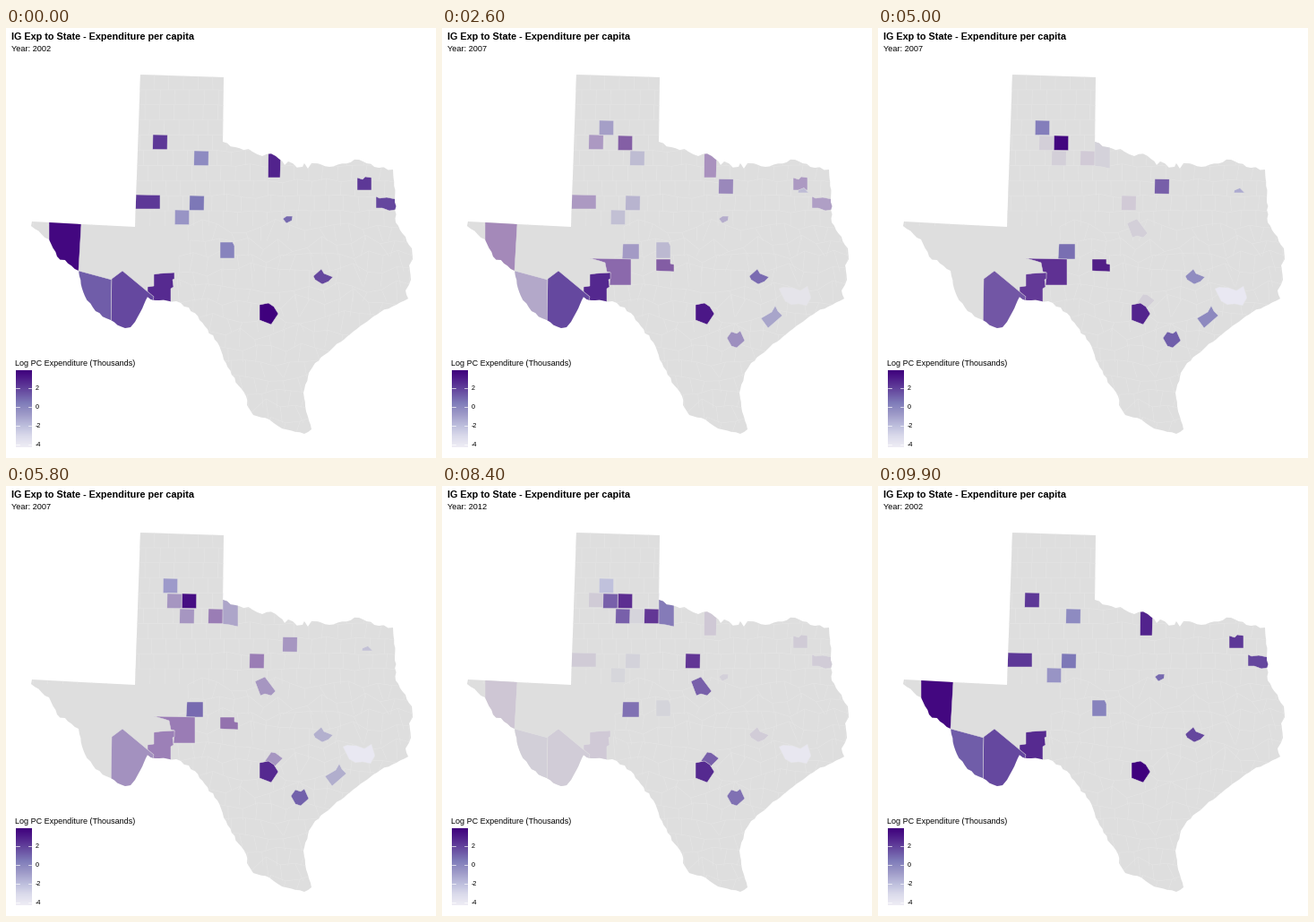
Recreate the animation shown at these times as a matplotlib script. Size 480 by 480 pixels, loop 10 s.

```python
import numpy as np
import matplotlib.pyplot as plt
from matplotlib.animation import FuncAnimation
from matplotlib.collections import LineCollection
from matplotlib.colors import LinearSegmentedColormap, to_rgb
from matplotlib.patches import Polygon

plt.rcParams["font.family"] = "Liberation Sans"
SIZE, DPI = 480, 100
LAND, BORDER = "#dedede", "#e4e4e4"
LOW, HIGH = -4.33, 3.86
PURPLES = LinearSegmentedColormap.from_list("purples", [
    "#efedf5", "#dadaeb", "#bcbddc", "#9e9ac8",
    "#807dba", "#6a51a3", "#54278f", "#3f007d"], N=512)
YEARS = (2002, 2007, 2012)
NA = None

# Transition starts and the offsets of their steps, in tenths of a second.
LONG = (0, 2, 4, 6, 8, 9, 11, 13, 15, 16)
SHORT = (0, 2, 4, 6, 8, 10, 12, 14, 15)
TRANSITIONS = ((17, LONG), (50, LONG), (84, SHORT))

# Key points of the outline; rivers and coast are roughened below.
STRAIGHT = [(29, 216), (48, 217), (84, 219), (144, 222), (150, 52), (243, 55)]
RED_RIVER = [(242, 127), (256, 133), (275, 138), (286, 143), (301, 143), (311, 153),
             (315, 149), (331, 155), (333, 151), (337, 157), (341, 151), (361, 155),
             (394, 147), (411, 155)]
EAST = [(432, 158), (434, 190), (435, 217), (453, 246), (454, 258), (450, 265),
        (452, 281), (446, 293), (449, 302)]
COAST = [(418, 317), (395, 333), (366, 356), (345, 374), (338, 385), (332, 407),
         (335, 428), (341, 448), (333, 453)]
RIO_GRANDE = [(308, 447), (294, 437), (276, 432), (269, 421), (268, 411), (252, 387),
              (243, 370), (236, 351), (216, 326), (204, 312), (190, 305), (171, 304),
              (158, 300), (150, 317), (144, 328), (139, 334), (133, 335), (117, 326),
              (100, 316), (88, 299), (82, 277), (81, 271), (57, 255), (48, 236),
              (28, 221)]

# Square counties: top left corner, then values for the three years.
SQUARES = [
    (164, 119, 2.2, NA, NA), (175.5, 103, NA, .5, -2), (180, 120, NA, NA, 1.5),
    (196.5, 120, NA, 3.75, 3.2), (194, 137, NA, NA, 1.5), (210, 137, -.2, NA, NA),
    (226, 137, NA, NA, 2.9), (309, 168.5, NA, 1.5, NA), (205, 187, .5, NA, NA),
    (188.5, 203, -.6, NA, NA), (272, 187, NA, NA, 2.9)]

# Other counties: values, then corners. Those on the border are cut by the outline.
NORTH = [
    ((2.2, NA, NA), [(145, 186), (172, 186.5), (172, 202), (144.5, 202)]),
    ((NA, NA, .7), [(242, 120), (259, 120), (259, 157), (250, 155), (242, 154)]),
    ((2.8, NA, NA), [(293, 130), (307, 130), (306, 167), (292.5, 167)]),
    ((2.2, NA, NA), [(392, 167), (398, 169), (401, 166), (408, 167), (408, 181),
                     (392, 181)]),
    ((NA, -1.2, NA), [(398, 181), (404, 178.5), (409.5, 184), (397, 184)]),
    ((1.8, NA, NA), [(413, 188), (417, 190), (425, 189), (440, 192), (440, 202),
                     (428, 204), (420, 201), (413, 201)])]
WEST = [
    ((NA, .7, 1), [(201.5, 241), (220, 241), (220, 257.5), (201, 257.5)]),
    ((.1, NA, NA), [(239, 239), (253, 239), (255, 243), (255, 257), (239, 257)]),
    ((NA, 3.86, NA), [(239, 258), (255, 258), (255, 263), (259, 264), (259, 272),
                      (239, 271)]),
    ((NA, 3, NA), [(165, 257), (211, 258), (211, 287), (187, 287), (188, 273),
                   (184, 272), (182, 262), (176, 260)]),
    ((2.6, 2.7, NA), [(165, 275), (172, 274), (188, 273), (188, 280), (186, 281),
                      (187, 289), (184, 291), (184, 315), (158, 303), (158, 289),
                      (165, 288)]),
    ((3.65, NA, NA), [(48, 210), (84, 219), (81, 271), (48, 271)])]
BIG_BEND = [
    ((1.2, NA, NA), [(81, 271), (118, 281), (117, 340), (81, 340)]),
    ((1.75, 1.75, NA), [(118, 280), (130, 271), (165, 300), (158, 340), (117, 340)])]
CENTRAL = [
    ((NA, NA, 1.5), [(278, 218), (289, 213), (301, 229), (296, 234), (289, 232),
                     (284, 234)]),
    ((.9, NA, NA), [(309, 213), (313, 210), (320, 210), (319, 215), (313, 218)]),
    ((1.8, .1, NA), [(343, 277), (352, 269), (355, 274), (365, 278), (360, 283),
                     (353, 286), (345, 281)]),
    ((NA, NA, 1.5), [(289, 307), (296, 297), (301, 298), (309, 304), (300, 313)]),
    ((3.86, 2.8, 2.5), [(283, 309), (293, 307), (299, 311), (304, 319), (296, 331),
                        (283, 326)])]
SOUTH = [
    ((NA, .2, NA), [(372, 310), (375, 316), (380, 321), (364, 335), (356, 324),
                    (368, 317)]),
    ((NA, 1.2, 1), [(318, 346), (323, 339), (329, 341), (333, 338), (338, 349),
                    (329, 357), (323, 355)]),
    ((NA, -4, -4), [(376, 291), (381, 289), (392, 290), (400, 293), (408, 288),
                    (412, 301), (407, 310), (398, 308), (390, 309), (383, 305)])]

TO_XYZ = np.array([[.4124, .3576, .1805], [.2126, .7152, .0722], [.0193, .1192, .9505]])
WHITE = TO_XYZ.sum(axis=1)


def to_lab(rgb):
    rgb = np.asarray(rgb)
    linear = np.where(rgb > .04045, ((rgb + .055) / 1.055) ** 2.4, rgb / 12.92)
    t = TO_XYZ @ linear / WHITE
    f = np.where(t > .008856, np.cbrt(t), 7.787 * t + 16 / 116)
    return np.array([116 * f[1] - 16, 500 * (f[0] - f[1]), 200 * (f[1] - f[2])])


def from_lab(lab):
    fy = (lab[0] + 16) / 116
    f = np.array([fy + lab[1] / 500, fy, fy - lab[2] / 200])
    t = np.where(f > .2069, f ** 3, (f - 16 / 116) / 7.787)
    linear = np.clip(np.linalg.solve(TO_XYZ, t * WHITE), 0, 1)
    return np.where(linear > .0031308, 1.055 * linear ** (1 / 2.4) - .055, 12.92 * linear)


def value_lab(value):
    if value is NA:
        return to_lab(to_rgb(LAND))
    return to_lab(PURPLES((value - LOW) / (HIGH - LOW))[:3])


def roughen(corners, amount, rng, step=4.5):
    """Subdivide a path and push the new points sideways."""
    path = []
    for a, b in zip(np.array(corners[:-1], float), np.array(corners[1:], float)):
        length = np.hypot(*(b - a))
        normal = np.array([a[1] - b[1], b[0] - a[0]]) / length
        path.append(a)
        for t in np.arange(1, int(length / step)) / int(length / step):
            path.append(a + t * (b - a) + normal * rng.normal(0, amount))
    return path


def state_outline():
    rng = np.random.default_rng(7)
    sections = [(STRAIGHT, 0), (RED_RIVER, 1.3), (EAST, .5), (COAST, .4),
                (RIO_GRANDE, .8)]
    path = []
    for i, (corners, amount) in enumerate(sections):
        following = sections[(i + 1) % len(sections)][0][0]
        path += roughen(corners + [following], amount, rng)
    return path


def county_lines():
    """Faint staggered grid, more irregular towards the south-east."""
    rng = np.random.default_rng(4)
    lines = []
    for row in range(24):
        y = 52 + 16.9 * row
        wobble = 0 if row < 10 else 3
        xs = np.arange(20 + rng.uniform(0, 16), 470, 16.3)
        if row >= 10:
            xs = xs[xs > 190]
        noise = rng.normal(0, 1, len(xs)) * (wobble + (xs > 245) * 1.5)
        lines.append(np.column_stack([xs, y + noise]))
        for x, dy in zip(xs, noise):
            lean = rng.normal(0, .3 + wobble + (x > 300))
            lines.append([(x, y + dy), (x + lean, y + 16.9)])
    return lines


def square(x, y, side=16.2):
    return [(x, y), (x + side, y + .3), (x + side - .2, y + side + .5),
            (x - .3, y + side + .3)]


fig = plt.figure(figsize=(SIZE / DPI, SIZE / DPI), dpi=DPI, facecolor="white")
ax = fig.add_axes([0, 0, 1, 1])
ax.axis("off")


def label(x, y, text, px, **style):
    return ax.text(x, y, text, fontsize=px * 72 / DPI, color="black", **style)


state = ax.add_patch(Polygon(state_outline(), fc=LAND, ec="none"))
grid = LineCollection(county_lines(), colors=BORDER, linewidths=.5, zorder=1.5)
ax.add_collection(grid, autolim=False)
grid.set_clip_path(state)

counties = [(values, square(x, y)) for x, y, *values in SQUARES]
counties += NORTH + WEST + BIG_BEND + CENTRAL + SOUTH
shapes = []
for values, corners in counties:
    shape = ax.add_patch(Polygon(corners, ec=BORDER, lw=.35, zorder=2))
    shape.set_clip_path(state)
    shapes.append((shape, values, [value_lab(v) for v in values]))

label(6, 13, "IG Exp to State - Expenditure per capita", 10.9, weight="bold")
subtitle = label(6, 26, "", 9.1)
label(10.5, 377, "Log PC Expenditure (Thousands)", 9.05)
ax.imshow(np.linspace(1, 0, 300)[:, None], cmap=PURPLES, aspect="auto",
          extent=(11, 28.3, 468, 382), zorder=2)
for tick in (2, 0, -2, -4):
    y = 422.5 - 10.5 * tick
    for x in (11, 24.8):
        ax.plot([x, x + 3.5], [y, y], color="white", lw=.5, zorder=3)
    label(33, y + 2.5, str(tick), 7.3)
ax.set(xlim=(0, SIZE), ylim=(SIZE, 0))


def progress(frame):
    """Current state, next state and how far the change has gone."""
    for i, (start, offsets) in reversed(list(enumerate(TRANSITIONS))):
        if frame >= start:
            done = sum(frame >= start + offset for offset in offsets)
            return i, (i + 1) % 3, done / len(offsets)
    return 0, 1, 0


def update(frame):
    old, new, t = progress(frame)
    subtitle.set_text(f"Year: {YEARS[new if t > .5 else old]}")
    for shape, values, labs in shapes:
        gone = (values[old] is NA or t == 1) and (values[new] is NA or t == 0)
        shape.set_visible(not gone)
        shape.set_facecolor(from_lab(labs[old] * (1 - t) + labs[new] * t))
    return [subtitle] + [shape for shape, *_ in shapes]


anim = FuncAnimation(fig, update, frames=100, interval=100, repeat=True,
                     repeat_delay=0, blit=False)
plt.show()
```
